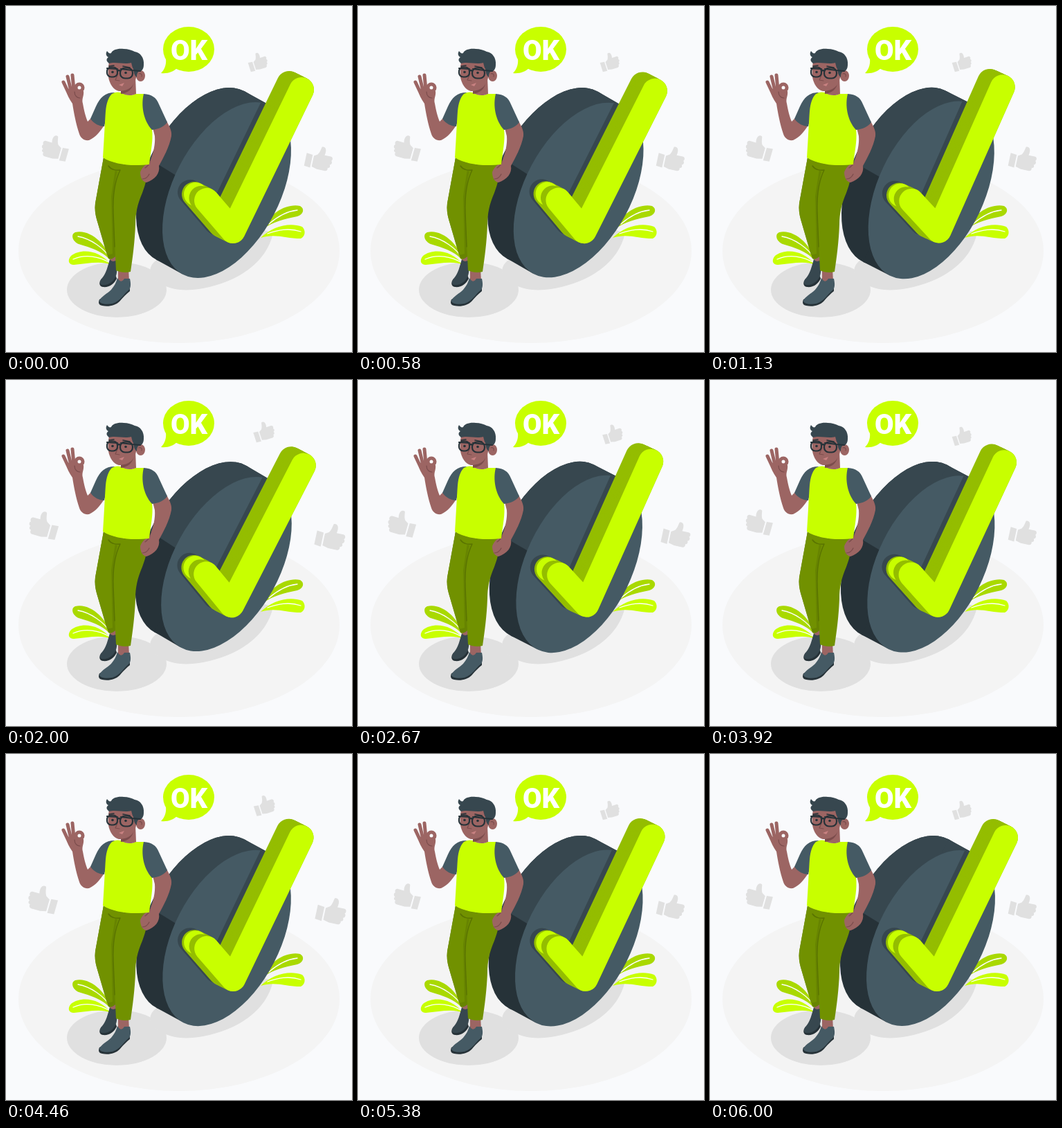
An HTML page for the animation above (6.04 s loop, 500 by 500 pixels).

```html
<!DOCTYPE html>
<html lang="en">
<head>
<meta charset="utf-8">
<title>OK</title>
<style>
  html, body { margin: 0; height: 100%; overflow: hidden; background: #f9fafc; }
  svg { display: block; width: 100%; height: 100%; }
  .lime { fill: #c8ff00; }
  .leaf { fill: #a9d900; }
  .grey { fill: #e0e0e0; }
  .skin { fill: #9c6563; }
  .slate { fill: #455a64; }
  .deep { fill: #37474f; }
  .ink { fill: #263238; }
  .line { fill: none; stroke-linecap: round; stroke-linejoin: round; }
  .vein { stroke: #fff; stroke-width: 1.3; }
  .tick { stroke: #c8ff00; stroke-width: 36; }
  .side { stroke: #94bd00; }
  .cast { stroke: #37474f; }
  .finger { stroke: #9c6563; stroke-width: 5; }
  .frame { stroke: #263238; stroke-width: 2.2; }
  .crease { stroke: #7b4c4c; stroke-width: 1.2; }
  text { font: 900 40px Roboto, sans-serif; fill: #fff; text-anchor: middle; }
</style>
</head>
<body>
<svg viewBox="0 0 500 500">
  <defs>
    <ellipse id="face" rx="76.8" ry="137.4" transform="translate(319 266) rotate(27.4)"/>
    <g id="rim">
      <use href="#face" x="-38" y="-21"/>
      <path d="M345 123.6L383 144.6L255 387.4L217 366.4Z"/>
    </g>
    <path id="mark" d="M427 121L328 325L290 281"/>
    <g id="thumb">
      <path d="M-19-6L-10-5V14L-19 13Z"/>
      <path d="M-8-4L-3-7C0-11 0-16 1-19C6-21 9-16 7-8H16C20-8 20-3 18-2C21 0 19 4 17 4C19 7 17 9 15 9C16 12 14 14 12 14H0L-8 12Z"/>
    </g>
    <clipPath id="onFace"><use href="#face"/></clipPath>
    <clipPath id="lit"><path d="M0 93V0H500V402Z"/></clipPath>
  </defs>

  <ellipse cx="250" cy="354" rx="232" ry="133" fill="#f4f4f4"/>
  <g class="grey">
    <ellipse cx="160" cy="410" rx="72" ry="40"/>
    <path d="M222 364C204 374 204 390 222 400C236 410 258 413 285 408C335 398 376 372 386 328L300 300Z"/>
    <g id="thumbs">
      <use href="#thumb" transform="translate(71 207) rotate(16) scale(-1 1)"/>
      <use href="#thumb" transform="translate(364 82) rotate(-18) scale(.72)"/>
      <use href="#thumb" transform="translate(452 222) rotate(12)"/>
    </g>
  </g>

  <!-- plants -->
  <path class="leaf" d="M372 322C380 300 405 285 425 289C432 293 430 301 421 304C402 308 385 312 372 322Z"/>
  <path class="lime" d="M368 335C385 318 410 312 428 319C434 325 432 333 426 336C405 336 388 328 368 335Z"/>
  <path class="leaf" d="M153 370C146 345 122 322 100 327C93 330 96 340 105 344C122 349 142 355 153 370Z"/>
  <path class="lime" d="M152 374C135 352 108 350 94 361C88 368 91 374 98 374C118 372 138 368 152 374Z"/>
  <path class="line vein" d="M421 295C402 297 388 308 380 315M426 326C408 320 392 324 378 329M104 333C122 336 142 350 151 365M97 366C115 358 135 362 150 371"/>

  <!-- disc and tick -->
  <g id="disc">
    <use href="#rim" class="ink"/>
    <use href="#rim" class="deep" clip-path="url(#lit)"/>
    <use href="#face" class="slate"/>
    <g clip-path="url(#onFace)"><use href="#mark" x="-24" y="-12" class="line tick cast"/></g>
    <g id="depth"></g>
    <circle class="lime" cx="274" cy="272" r="17"/>
    <circle fill="#94bd00" cx="282" cy="277.5" r="17.5"/>
    <use href="#mark" class="line tick"/>
  </g>

  <!-- bubble -->
  <ellipse class="lime" cx="264" cy="62.500" rx="37" ry="32.500"/>
  <path class="lime" d="M231 76C232 85 229 92 224 97C234 98 242 95 248 89Z"/>
  <text x="264.500" y="78">OK</text>

  <!-- legs -->
  <path class="skin" d="M152 355H159V373L150 370Z"/>
  <path class="ink" d="M138 394C134 399 134 405 140 406C149 407 156 402 160 394L158 388Z"/>
  <path class="deep" d="M150 366C153 370 156 369 159 368C161 378 161 386 158 392C154 400 146 404 139 403C134 402 136 397 139 393C145 386 147 376 150 366Z"/>
  <path class="skin" d="M162 380H177L178 397L162 399Z"/>
  <path class="ink" d="M135 424C133 429 134 432 139 433C148 435 158 433 164 427C169 421 174 416 179 412V406Z"/>
  <path class="slate" d="M161 393C166 401 169 397 171 394L179 394C181 403 180 407 178 410C170 416 166 426 154 430C144 432 135 430 135 426C137 420 146 416 152 410C157 404 159 400 161 393Z"/>
  <path fill="#678400" d="M141 219L129 285C128 293 129 301 131 308L148 365C152 367 156 364 159 361L166 235Z"/>
  <path fill="#719100" d="M141 219L129 285C128 293 129 301 131 308L146 360L154 358L152 275L158 236Z"/>
  <path fill="#719100" d="M141 219C160 230 188 231 208 228C205 243 202 257 197 270C190 286 187 300 187 316C186 342 183 364 180 384C173 386 165 385 159 382L155 300C154 280 156 258 161 239L146 233Z"/>
  <path class="line" stroke="#5a7400" stroke-width="1.500" d="M148 231C152 237 160 238 165 237C157 253 154 275 155 300L157 348"/>

  <!-- raised arm -->
  <path class="skin" d="M88 122C92 117 100 116 104 123L112 123C113 130 109 134 111 141C113 152 115 160 118 167L124 161L142 172C136 182 129 190 120 194C113 195 108 191 106 185C101 170 98 154 96 141C91 133 88 129 88 122Z"/>
  <path class="line finger" d="M83 110L91 127M89 102L94 123M96 100L98 121"/>
  <circle class="line finger" cx="106" cy="118" r="5"/>
  <path class="line crease" d="M99 124C99 130 103 133 107 133"/>

  <!-- torso -->
  <path class="skin" d="M232 166C236 174 240 180 239 188C236 204 227 220 221 231C223 242 215 251 203 255C197 254 194 248 194 240C197 232 203 228 208 225C213 212 216 200 215 188L212 176Z"/>
  <path class="line crease" d="M208 225C207 229 204 232 201 234M197 250C202 250 205 247 207 243"/>
  <path class="slate" d="M157 125C143 125 136 132 130 145L122 163C127 170 135 174 142 174L147 152Z"/>
  <path class="lime" d="M153 127C158 124 162 124 166 125C174 130 182 130 187 127L200 127C197 145 199 165 211 178C213 195 209 210 207 229C182 232 156 229 140 219C142 190 143 165 144 152C145 140 148 132 153 127Z"/>
  <path class="slate" d="M199 127C211 128 217 132 221 142L233 168C228 175 220 178 211 179C198 165 195 143 199 127Z"/>

  <!-- head -->
  <path class="skin" d="M166 112V125C172 130 182 130 188 127L187 102Z"/>
  <path fill="#7b4c4c" d="M166 122C175 121 181 117 185 110C183 120 176 126 166 127Z"/>
  <path class="skin" d="M149 80H188C191 95 188 110 182 116C177 121 170 123 163 123C155 121 150 113 148 103C147 95 148 87 149 80Z"/>
  <ellipse class="skin" cx="194.500" cy="101" rx="6.500" ry="8"/>
  <path class="deep" d="M149 83C144 79 145 76 148 74C144 72 144 68 146 65C148 68 150 69 152 68C154 63 162 61 170 62C176 62 182 64 186 66C194 67 200 75 199 85C199 90 197 93 195 94C190 94 189 98 189 103C185 100 185 96 184 91C182 88 182 85 181 82C171 85 158 80 149 83Z"/>
  <path class="line crease" d="M162 98L158 107L164 108M192 98C195 97 197 99 196 102"/>
  <path fill="#c98282" d="M163 114L171 111L168 116Z"/>
  <g class="line frame">
    <rect x="146" y="88.500" width="15" height="14" rx="6"/>
    <rect x="165" y="89.500" width="18" height="15" rx="7"/>
    <path d="M146 90L161 91M161 94Q163 92 165 94M166 91L183 93L194 94"/>
    <path stroke-width="1.600" d="M149 87L156 86M169 87L179 89"/>
  </g>
  <circle class="ink" cx="154" cy="95.500" r="1.800"/>
  <circle class="ink" cx="173" cy="96.500" r="1.800"/>
</svg>
<script>
  const LOOP = 6040;
  const $ = id => document.getElementById(id);

  // Extruded side of the tick, back to front
  $('depth').innerHTML = Array.from({ length: 19 }, (_, i) =>
    `<use href="#mark" x="${i - 18}" y="${(i - 18) / 2}" class="line tick side"/>`).join('');

  // Same curve as CSS "ease"
  function ease(x) {
    const bez = (a, b, s) => 3 * a * s * (1 - s) ** 2 + 3 * b * s * s * (1 - s) + s ** 3;
    let lo = 0, hi = 1;
    for (let i = 0; i < 20; i++) {
      const mid = (lo + hi) / 2;
      if (bez(.25, .25, mid) < x) lo = mid; else hi = mid;
    }
    return bez(.1, 1, lo);
  }

  function track(keys, t, curve = x => x) {
    const i = keys.findIndex(k => k[0] > t);
    if (i < 0) return keys[keys.length - 1][1];
    if (i === 0) return keys[0][1];
    const [t0, a] = keys[i - 1], [t1, b] = keys[i];
    return a + (b - a) * curve((t - t0) / (t1 - t0));
  }

  const rock = [[0, 0], [375, 2], [1125, -2], [1500, 0]];
  const beat = [[1655, 1], [2255, 1.1], [3455, 1], [4055, 1], [4655, 1.1], [5255, 1]];

  function draw(now) {
    const t = now % LOOP;
    $('disc').setAttribute('transform', `rotate(${track(rock, t % 1500)} 316.5 244)`);
    $('thumbs').setAttribute('transform',
      `translate(261.5 152) scale(${track(beat, t, ease)}) translate(-261.5 -152)`);
  }

  const start = performance.now();
  function tick() {
    draw(performance.now() - start);
    requestAnimationFrame(tick);
  }
  tick();
</script>
</body>
</html>
```
